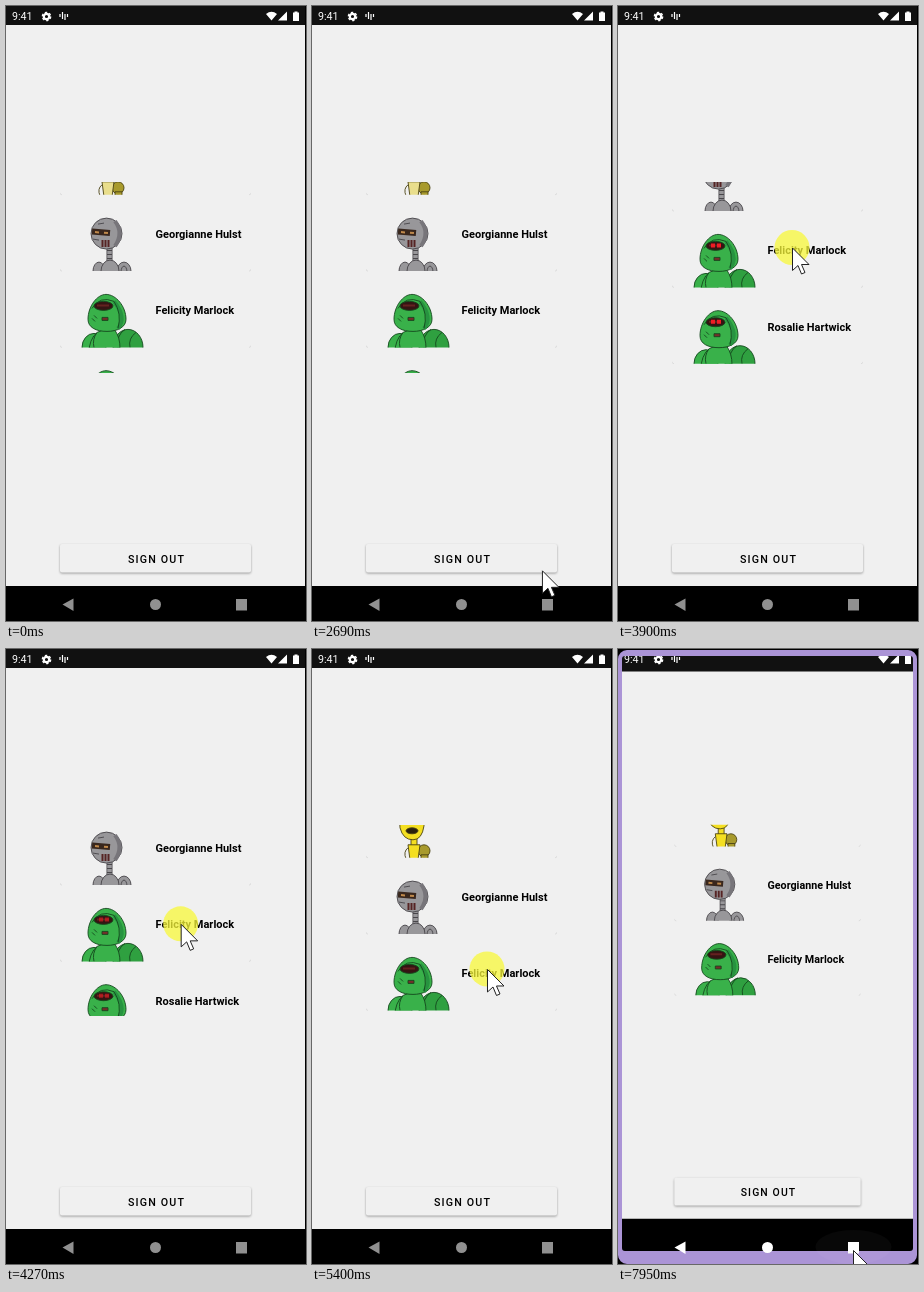
Write an HTML page that moves like this. It is 300 px wide and 615 px high and loops after 8 s.

```html
<!DOCTYPE html>
<html lang="en">
<head>
<meta charset="utf-8">
<title>User list</title>
<style>
  html, body { margin: 0; height: 100%; overflow: hidden; background: #000; }
  svg { display: block; font-family: Roboto, sans-serif; }
  .name { font-weight: 700; font-size: 11px; }
  .ink { stroke-width: .9; stroke-linejoin: round; }
  .line { fill: none; }
  #button { filter: drop-shadow(0 1px 1px rgba(0, 0, 0, .35)); }
</style>
</head>
<body>
<svg width="300" height="615" viewBox="0 0 300 615">
  <defs>
    <clipPath id="list"><path d="M54 176H245V367H54Z"/></clipPath>
    <clipPath id="card"><path d="M54-70H245V0H54Z"/></clipPath>

    <!-- avatars stand on y = 0, the card cuts off the rest -->
    <g id="yellow" class="ink" stroke="#4a4212" fill="var(--yellow)">
      <path d="M99-20H105V-9H99Z"/>
      <ellipse cx="112" cy="-7" rx="6" ry="6" fill="#a89a2c"/>
      <path d="M109-3H116V2H109Z" fill="#a89a2c"/>
      <path d="M96-13H108L106 2H98Z"/>
      <path class="line" d="M96-10Q91-6 94 1"/>
      <path d="M87-50H112V-32Q110-18 101-18 91-18 88-30Z"/>
      <path d="M85-43Q99-46 114-43V-38Q99-34 85-38Z"/>
      <path d="M88-40H111" stroke-width="1.5"/>
      <ellipse cx="100" cy="-27" rx="6" ry="3" fill="#2b210c"/>
    </g>

    <g id="gray" class="ink" stroke="#48464a" fill="#98979a">
      <path d="M103.5-24V-9" stroke-width="6"/>
      <path d="M103.5-24V-9" stroke="#98979a" stroke-width="4.500" stroke-dasharray="3 1"/>
      <ellipse cx="93" cy="0" rx="6" ry="9"/>
      <ellipse cx="118" cy="0" rx="7" ry="9"/>
      <ellipse cx="118" cy="1" rx="3" ry="6"/>
      <ellipse cx="104" cy="0" rx="9" ry="11"/>
      <ellipse cx="100.500" cy="-37.500" rx="15.500" ry="15.500"/>
      <path class="line" d="M109-50Q118-38 109-25" stroke="#77757a" stroke-width="4"/>
      <path d="M86-39.500L104-38" stroke="#39271d" stroke-width="6"/>
      <path d="M89-39L102-38" stroke="#c08a4c" stroke-width="2" stroke-dasharray="4 5"/>
      <path d="M87-32L93-31M92-47L98-48"/>
      <path d="M95.500-27.500H104" stroke="#562424" stroke-width="7" stroke-dasharray="2 1"/>
    </g>

    <g id="green" class="ink" stroke="#15481d" fill="#39b14a">
      <ellipse cx="122" cy="0" rx="15" ry="18" fill="#2fa040"/>
      <path class="line" d="M119-18Q110-12 112 0M130-15Q122-9 124 0"/>
      <ellipse cx="88" cy="0" rx="12" ry="14"/>
      <path d="M83 1Q86-15 96-17H109Q114-10 114 1Z"/>
      <path class="line" d="M91-15Q86-8 88 0"/>
      <path d="M100-53C110-53 120-41 120-28 120-20 111-16 101-16 90-16 82-20 82-28 82-41 91-53 100-53Z"/>
      <path class="line" d="M108-46Q121-30 112-19" stroke="#279340" stroke-width="4"/>
      <path class="line" d="M86-39Q94-52 108-46 116-34 112-19"/>
      <ellipse cx="97.500" cy="-41.500" rx="9.500" ry="4.500" fill="#351413"/>
      <path d="M91-42H103" stroke="#642220" stroke-width="2"/>
      <path class="glow" d="M93-42H103" stroke="#ef1c24" stroke-width="4" stroke-dasharray="4 2"/>
      <path d="M96-30H102V-27H96Z" fill="#762f2b"/>
      <path d="M88-32L91-29M86-29L89-26"/>
    </g>
  </defs>

  <g id="app">
    <path fill="#f0f0f0" d="M0 0H299V615H0Z"/>
    <path fill="#111" d="M0 0H299V19H0Z"/>
    <path d="M0 580H299V615H0Z"/>
    <g clip-path="url(#list)"><g id="rows"></g></g>
    <rect id="button" x="54" y="538" width="191" height="28.500" rx="2" fill="#f0f0f0"/>
    <text x="122" y="556.500" font-size="10.700" font-weight="500" letter-spacing="1.150">SIGN OUT</text>
  </g>

  <g fill="#fff">
    <text x="6" y="14" font-size="10.700">9:41</text>
    <g fill="none" stroke="#fff">
      <circle cx="40.500" cy="10.500" r="2.700" stroke-width="2.200"/>
      <circle cx="40.500" cy="10.500" r="4.200" stroke-width="1.300" stroke-dasharray="2.400 2"/>
      <path d="M54 8V11M56.500 6V13M59 8V14M61.500 8V11" stroke-width="1.200"/>
    </g>
    <path d="M260 8Q265.500 3.500 271 8L265.500 14.500ZM281 5.500V14.500H272ZM287 6.500H288.500V5.500H291.500V6.500H293V15H287Z"/>
  </g>

  <g id="frame" fill-rule="evenodd">
    <path id="corners"/>
    <path id="border" fill="#ab94d6"/>
  </g>

  <ellipse id="ripple" cx="235.500" cy="598" fill="#fff" ry="17"/>
  <g id="nav">
    <path d="M56.500 598.500L67.500 592.500V605Z"/>
    <circle cx="149.500" cy="598.500" r="5.500"/>
    <path d="M230 593H241V604.500H230Z"/>
  </g>

  <g id="cursor">
    <circle id="press" r="17.500" fill="#f9f83a" opacity=".75"/>
    <path d="M.5.5V23L6 18 9.500 26.500 13 25 9.500 17H17Z" fill="#fff" stroke="#222"/>
  </g>
</svg>
<script>
const LOOP = 8000, ROW = 76.3;
const $ = id => document.getElementById(id);

const people = [
  ['Oscar Pinder', 'yellow'],
  ['Georgianne Hulst', 'gray'],
  ['Felicity Marlock', 'green'],
  ['Rosalie Hartwick', 'green']
];
$('rows').innerHTML = people.map(([name, robot], i) => `
  <g transform="translate(0 ${188.8 + ROW * i})">
    <path d="M54-2Q54 0 56 0M245-2Q245 0 243 0" fill="none" stroke="#dcdcdc"/>
    <g clip-path="url(#card)"><use href="#${robot}"/></g>
    <text class="name" x="149.500" y="-33">${name}</text>
  </g>`).join('');

// each move eases pointer and list: from, to, x, y, list offset
const home = { x: 262, y: 616, list: 0 };
const moves = [
  [130, 1060, 175, 326, 0],
  [2090, 2890, 240, 608, 0],
  [2990, 3170, 175, 319, 0],
  [3350, 3900, 174, 241.5, -60],
  [4060, 4600, 176, 340, 31.5],
  [4830, 5240, 175, 320, 20],
  [5400, 5600, 174, 310, 11],
  [5850, 6470, 235, 612, 9.5],
  [6630, 6790, 235, 601, 9.5]
];

const ramp = (t, a, b) => Math.max(0, Math.min(1, (t - a) / (b - a)));
const smooth = u => u * u * (3 - 2 * u);
const mix = (a, b, u) => a + (b - a) * u;

const pose = t => moves.reduce((p, [from, to, x, y, list]) => {
  const u = smooth(ramp(t, from, to));
  return { x: mix(p.x, x, u), y: mix(p.y, y, u), list: mix(p.list, list, u) };
}, home);

const box = (x, y, w, h, r) =>
  `M${x + r} ${y}h${w - 2 * r}a${r} ${r} 0 0 1 ${r} ${r}v${h - 2 * r}a${r} ${r} 0 0 1 ${-r} ${r}` +
  `h${2 * r - w}a${r} ${r} 0 0 1 ${-r} ${-r}v${2 * r - h}a${r} ${r} 0 0 1 ${r} ${-r}Z`;

function draw(t) {
  const { x, y, list } = pose(t);
  $('cursor').setAttribute('transform', `translate(${x} ${y})`);
  $('press').style.display = t >= 3350 && t < 5850 ? '' : 'none';
  $('rows').setAttribute('transform', `translate(0 ${list})`);

  document.documentElement.style.setProperty('--yellow', t < 3350 ? '#e9de8c' : '#f4df22');
  document.querySelector('.glow').style.opacity = ramp(list, -15, -40);

  const lit = ramp(t, 6980, 7200), c = Math.round(mix(144, 255, lit));
  $('nav').setAttribute('fill', `rgb(${c},${c},${c})`);
  $('ripple').setAttribute('rx', mix(20, 38, lit));
  $('ripple').style.opacity = lit * mix(.07, .03, ramp(t, 7520, 7590));

  // the app shrinks into the overview in two steps
  const p = t < 7890 ? 0 : t < 7950 ? .5 : 1;
  $('app').setAttribute('transform', `translate(${3.66 * p} ${4 * p}) scale(${1 - .0245 * p})`);
  $('frame').style.display = p ? '' : 'none';
  const rim = box(0, 1, 299, 614, 9);
  const hole = box(4 * p, 1 + 6 * p, 299 - 8 * p, 614 - 19 * p, 3);
  $('corners').setAttribute('d', 'M0 0H300V615H0Z' + hole);
  $('border').setAttribute('d', rim + hole);
}

const start = performance.now();
function tick() {
  draw((performance.now() - start) % LOOP);
  requestAnimationFrame(tick);
}
tick();
</script>
</body>
</html>
```
